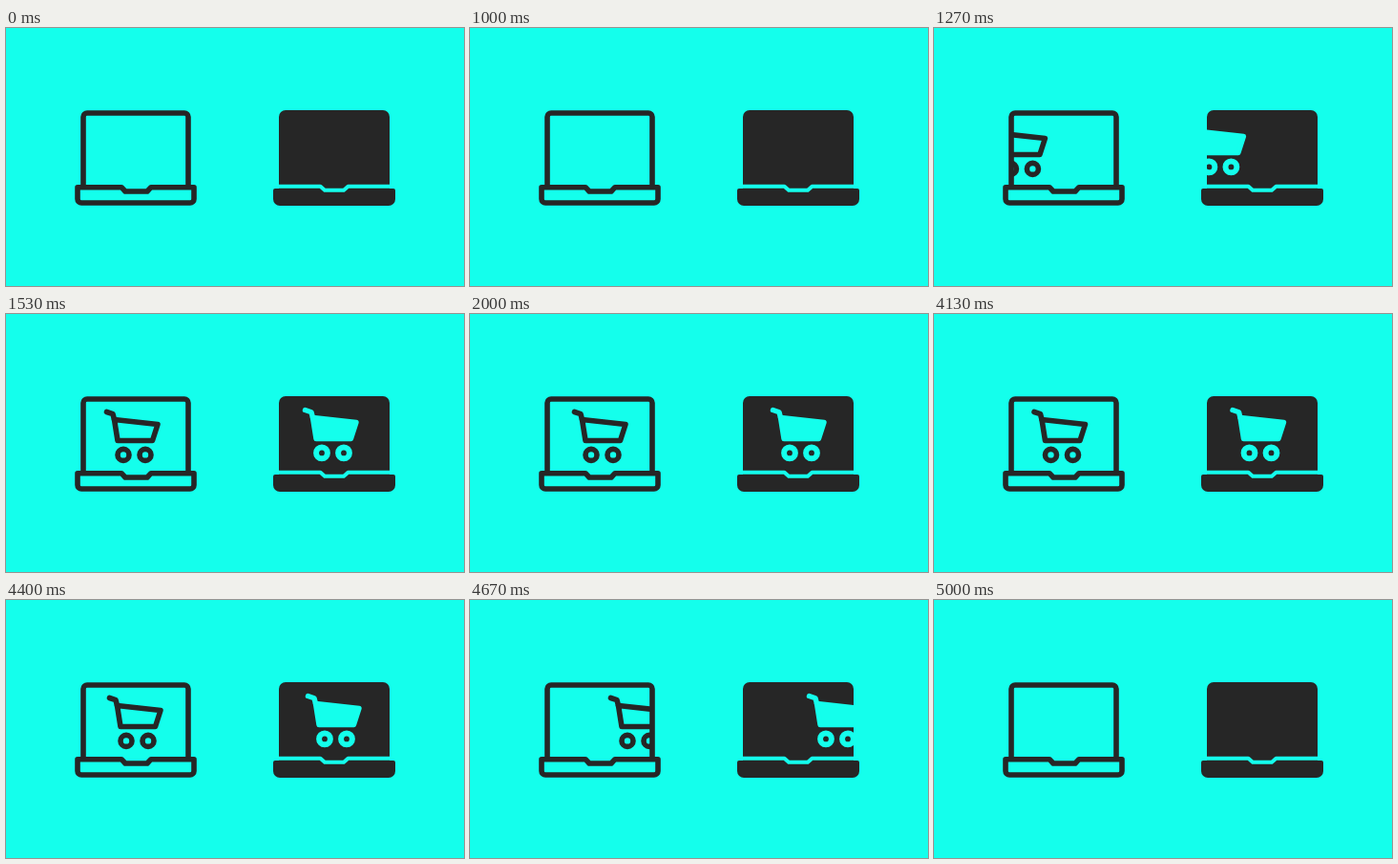
These frames come from a looping animation (480x270 px, 5.99 s). An HTML page:

```html
<!DOCTYPE html>
<html lang="en">
<head>
<meta charset="utf-8">
<title>Laptop and shopping cart</title>
<style>
  html, body { margin: 0; width: 100%; height: 100%; overflow: hidden; background: #14ffec; }
  svg { display: block; width: 100vw; height: 100vh; --bg: #14ffec; --ink: #262626; }
  .line { fill: none; stroke: var(--ink); stroke-width: 5.6; stroke-linecap: round; stroke-linejoin: round; }
  .ink { fill: var(--ink); }
  .solid { fill: var(--bg); stroke: var(--bg); stroke-width: 5.4; stroke-linecap: round; stroke-linejoin: round; }
  .gap { fill: none; stroke: var(--bg); stroke-width: 4; stroke-linejoin: round; }
</style>
</head>
<body>
<svg viewBox="0 0 480 270">
  <defs>
    <clipPath id="lineScreen"><rect x="81" y="89" width="110" height="77"/></clipPath>
    <clipPath id="solidScreen"><rect x="78" y="86" width="116" height="78"/></clipPath>
    <path id="handle" d="M109.5 102.5L116 104.7L117.5 110.5"/>
    <path id="basket" d="M117.5 110.5L163 115.5L157.5 132.5H121Z"/>
  </defs>

  <g class="line">
    <g clip-path="url(#lineScreen)">
      <g class="cart">
        <use href="#handle"/>
        <use href="#basket"/>
        <circle cx="127" cy="147.4" r="6"/>
        <circle cx="150" cy="147.4" r="6"/>
      </g>
    </g>
    <path d="M81 166V93a4 4 0 0 1 4-4H187a4 4 0 0 1 4 4V166"/>
    <path d="M75 166.7H121L125 171H148L152 166.7H197V179a4 4 0 0 1-4 4H79a4 4 0 0 1-4-4Z"/>
  </g>

  <g transform="translate(208 0)">
    <path class="ink" d="M78 170V93a7 7 0 0 1 7-7H187a7 7 0 0 1 7 7V170Z"/>
    <path class="ink" d="M72 170a2 2 0 0 1 2-2H198a2 2 0 0 1 2 2V179a7 7 0 0 1-7 7H79a7 7 0 0 1-7-7Z"/>
    <path class="gap" d="M70 165.8H121.5L126 169.8H146L150.5 165.8H202"/>
    <g clip-path="url(#solidScreen)">
      <g class="cart">
        <g transform="translate(0 -2)">
          <use href="#handle" class="solid" style="fill:none"/>
          <use href="#basket" class="solid"/>
          <circle class="solid" cx="127" cy="147.4" r="6.2"/>
          <circle class="solid" cx="150" cy="147.4" r="6.2"/>
          <circle class="ink" cx="127" cy="147.4" r="2.9"/>
          <circle class="ink" cx="150" cy="147.4" r="2.9"/>
        </g>
      </g>
    </g>
  </g>
</svg>
<script>
  const LOOP = 5990, STEP = 1000 / 15;
  // Horizontal cart offset at each step of the one-second moves
  const enter = [-88, -83, -73, -60, -46.6, -33.5, -21.5, -11.5, -4, 1, 3.5, 4.5, 4, 2.5, 1, 0];
  const leave = [0, -1.5, -4.5, -7, -7.5, -5.5, -1, 5, 13.5, 25, 38, 51.5, 64, 75, 83, 88];
  const carts = document.querySelectorAll('.cart');
  const at = (table, i) => table[Math.max(0, Math.min(15, i))];

  function draw(now) {
    const step = Math.floor((now % LOOP + 5) / STEP);
    const x = step < 60 ? at(enter, step - 15) : at(leave, step - 60);
    for (const cart of carts) cart.setAttribute('transform', `translate(${x} 0)`);
  }

  const start = performance.now();
  function tick() {
    draw(performance.now() - start);
    requestAnimationFrame(tick);
  }
  tick();
</script>
</body>
</html>
```
